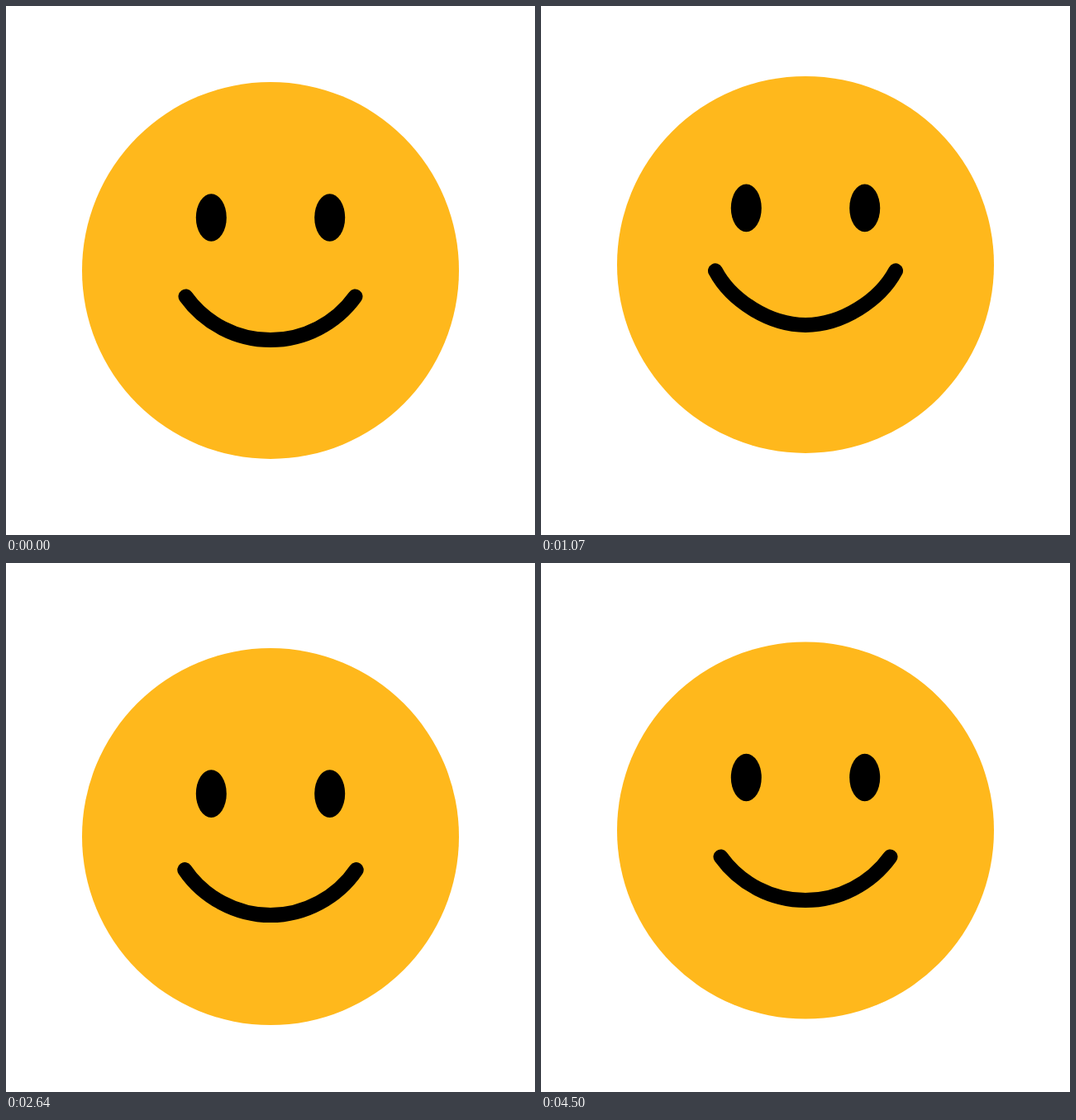
These frames come from a looping animation (640 by 640 pixels, 5140 ms). An HTML page:

```html
<!DOCTYPE html>
<html lang="en">
<head>
<meta charset="utf-8">
<title>Bouncing smiley</title>
<style>
html, body { margin: 0; width: 100%; height: 100%; overflow: hidden; background: #fff; }
svg { display: block; width: 100vw; height: 100vh; }
.line { fill: none; stroke: #000; stroke-linecap: round; }
</style>
</head>
<body>
<svg viewBox="0 0 640 640">
  <circle id="face" cx="320" cy="320" r="228" fill="#ffb81c"/>
  <g id="open">
    <ellipse cx="248.3" cy="256" rx="18.5" ry="28.8"/>
    <ellipse cx="391.7" cy="256" rx="18.5" ry="28.8"/>
  </g>
  <path id="closed" class="line" stroke-width="10" d="M226.8 278.8L270.8 278.4M369.2 278.4L413.2 278.8"/>
  <path id="mouth" class="line" stroke-width="18"/>
</svg>
<script>
const LOOP = 5140, STEP = LOOP / 72;
const times = [71, 430, 610, 1070, 1210, 1720, 2140, 2360, 2640, 2760, 2930, 3540, 4070, 4500];

// Vertical offsets of each part, and the depth of the smile
const faceY = [0, 28, 37.8, -7, -13.3, -20.5, -17.5, -9.3, 11, 13.6, 11.8, -0.6, 2.6, 3.6];
const eyesY = [0, 54.5, 75, -11.5, -23, -40, -34, -18, 23, 28, 24, -2.2, 2, 3.5];
const mouthY = [0, 55, 74, -18, -30, -46, -40, -21, 22, 27, 23.5, -2, 2.4, 4];
const depth = [52.5, 49, 48, 65.5, 69, 75.5, 74, 66, 55, 53.5, 52, 52, 52.5, 52.5];

const $ = id => document.getElementById(id);
const face = $('face'), open = $('open'), closed = $('closed'), mouth = $('mouth');

const rate = (v, i) => (v[i + 1] - v[i]) / (times[i + 1] - times[i]);

// Flat at turning points and at both ends
function slope(v, i) {
  if (i === 0 || i === v.length - 1) return 0;
  const a = rate(v, i - 1), b = rate(v, i);
  return a * b > 0 ? 2 * a * b / (a + b) : 0;
}

function at(v, t) {
  const last = times.length - 1;
  if (t <= times[0]) return v[0];
  if (t >= times[last]) return v[last];
  const i = times.findIndex(k => k > t) - 1;
  const span = times[i + 1] - times[i], u = (t - times[i]) / span, w = 1 - u;
  return v[i] * w * w * (1 + 2 * u) + v[i + 1] * u * u * (3 - 2 * u)
    + span * u * w * (slope(v, i) * w - slope(v, i + 1) * u);
}

function smile(bottom, d) {
  const half = 102.5 + (d - 52.5) / 2;
  const angle = 2 * Math.atan(d / half);
  const dx = half - 40 * Math.cos(angle), y = bottom - d, cy = y + 40 * Math.sin(angle);
  const flat = 41 + (d - 52.5) / 4;
  return `M${320 - half} ${y}C${320 - dx} ${cy} ${320 - flat} ${bottom} 320 ${bottom}`
    + `S${320 + dx} ${cy} ${320 + half} ${y}`;
}

const shift = (el, y) => el.setAttribute('transform', `translate(0 ${y})`);

function draw(now) {
  const t = Math.floor((now % LOOP + 5) / STEP) * STEP;
  const blink = t > 280 && t < 800;
  shift(face, at(faceY, t));
  shift(open, at(eyesY, t));
  shift(closed, at(eyesY, t));
  open.style.display = blink ? 'none' : '';
  closed.style.display = blink ? '' : 'none';
  mouth.setAttribute('d', smile(404 + at(mouthY, t), at(depth, t)));
}

let start;
function tick(now) {
  start ??= now;
  draw(now - start);
  requestAnimationFrame(tick);
}
draw(0);
requestAnimationFrame(tick);
</script>
</body>
</html>
```
